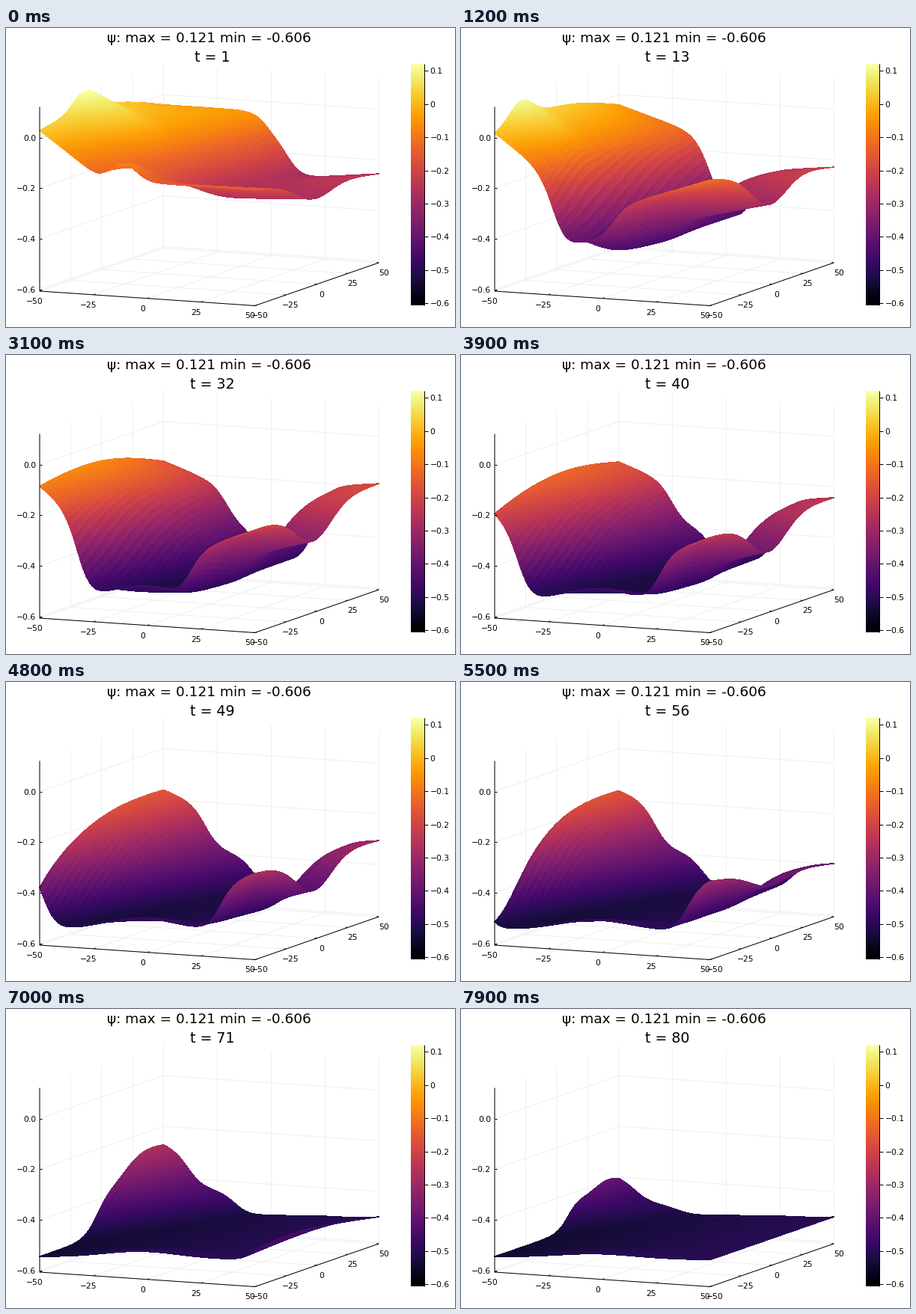
Recreate the animation shown at these times as a matplotlib script. Size 600 px wide and 400 px high, loop 8000 ms.

```python
import numpy as np
import matplotlib.pyplot as plt
from matplotlib.animation import FuncAnimation
from matplotlib.collections import LineCollection, PolyCollection

W, H, DPI = 600, 400, 100
STEPS, INTERVAL = 80, 100
Z_MIN, Z_MAX = -0.606, 0.121
N = 71                 # mesh points per side
CMAP = plt.get_cmap("inferno")
plt.rcParams["font.family"] = "DejaVu Sans"

U, V = np.meshgrid(np.linspace(0, 1, N), np.linspace(0, 1, N))


def keyed(n, *points):
    steps, values = zip(*points)
    return np.interp(n, steps, values)


def mix(a, b, t):
    return a + (b - a) * t


def wall(x, width=0.032):
    """Smooth step from 0 to 1 around x = 0."""
    return (1 + np.tanh(x / width / 2)) / 2


def hill(x, center, width):
    return np.exp(-((x - center) / width) ** 2)


def height(n):
    """Two highlands left and right of a valley that sinks, then widens."""
    sunk = 1 - np.exp(-n / 6)

    # Heights of the four corners
    left = keyed(n, (0, 0.028), (12, 0.013), (31, -0.084), (48, -0.3))
    back = keyed(n, (0, -0.04), (12, -0.04), (31, -0.156), (63, -0.168), (79, -0.4))
    front = keyed(n, (0, -0.15), (12, -0.11), (31, -0.2), (63, -0.32), (79, -0.5))
    right = keyed(n, (0, -0.255), (31, -0.187), (48, -0.305), (63, -0.5))

    # Valley floor, with a swell along the front edge
    floor = (-0.5 - 0.045 * (1 - U)) * (0.28 + 0.72 * sunk)
    floor += 0.1 * (1 - n / 95) * hill(V, 0, 0.15) * hill(U, 0.47, 0.25)

    # Left highland: a crest slides forward along its edge
    west = mix(left, back, V) + 0.05 * np.sin(np.pi * V)
    west -= U * mix(0.6, 0.3 * sunk, V)
    crest = 0.075 * np.clip((31 - n) / 10, 0, 1)
    west += crest * hill(V, 0.37 - 0.013 * n, 0.13) * hill(U, 0, 0.35)

    # Right highland, with a saddle halfway along its edge
    east = mix(front, right, V)
    east -= (1 - U) * mix(0.35 * sunk, 0.1, V)
    saddle = 0.13 * (0.5 + 0.5 * sunk) * np.clip((60 - n) / 12, 0, 1)
    east -= saddle * hill(V, 0.47, 0.2)

    # The valley's borders retreat; the left one splits into a terrace
    west_end = mix(0.30 - 1.2e-4 * n ** 2, 0.48 - 0.0036 * n, V)
    east_end = mix(0.44 + 0.0082 * n, 0.58 + 0.004 * n, V)
    split = 0.11 * min(n / 48, 1) * V
    west_part = (wall(west_end - split - U) + wall(west_end + split - U)) / 2
    east_part = wall(U - east_end)
    z = floor + west_part * (west - floor) + east_part * (east - floor)
    return np.clip(z, Z_MIN, Z_MAX)


def project(x, y, z):
    px = 45 + 2.877 * (x + 50) + 1.655 * (y + 50)
    py = 352 + 0.195 * (x + 50) - 0.575 * (y + 50) - 339 * (z - Z_MIN)
    return np.stack(np.broadcast_arrays(px, py), axis=-1)


def pt(px):
    return px * 72 / DPI


fig = plt.figure(figsize=(W / DPI, H / DPI), dpi=DPI, facecolor="white")
ax = fig.add_axes([0, 0, 1, 1])
ax.axis("off")


def label(x, y, text, ha="center", size=10.8, va="center_baseline"):
    return ax.text(x, y, text, ha=ha, va=va, fontsize=pt(size), zorder=6)


def lines(segments, color, width, zorder):
    ax.add_collection(LineCollection(segments, colors=color,
                                     linewidths=pt(width), zorder=zorder))


def number(value, digits):
    return f"{value:.{digits}f}".replace("-", "\u2212")


# Grid on the floor and the two back walls
ticks = range(-50, 51, 25)
z_ticks = [0.0, -0.2, -0.4, -0.6]
paths = []
for c in ticks:
    paths.append([(c, -50, Z_MIN), (c, 50, Z_MIN), (c, 50, Z_MAX)])
    paths.append([(50, c, Z_MIN), (-50, c, Z_MIN), (-50, c, Z_MAX)])
for c in z_ticks:
    paths.append([(-50, -50, c), (-50, 50, c), (50, 50, c)])
lines([[project(*p) for p in path] for path in paths], "#ededed", 0.9, 1)

# Axes, tick marks and tick labels
axis = [(-50, -50, Z_MAX), (-50, -50, Z_MIN), (50, -50, Z_MIN), (50, 50, Z_MIN)]
marks = [[project(*p) for p in axis]]
for c in ticks:
    x, y = project(c, -50, Z_MIN)
    marks.append([(x, y), (x + 2.8, y - 1)])
    label(x - 6.5, y + 13, number(c, 0))
    x, y = project(50, c, Z_MIN)
    marks.append([(x, y), (x - 3, y - 0.2)])
    label(x + 6.5, y + 13, number(c, 0))
for c in z_ticks:
    x, y = project(-50, -50, c)
    marks.append([(x, y), (x + 3, y)])
    label(x - 5, y, number(c, 1), "right")

# Colour bar
BAR_L, BAR_R, BAR_T, BAR_B = 540.5, 558.5, 48, 371
ax.imshow(np.linspace(1, 0, 256)[:, None], cmap=CMAP, aspect="auto",
          extent=(BAR_L, BAR_R, BAR_B, BAR_T), zorder=2)
ax.set_xlim(0, W)
ax.set_ylim(H, 0)
marks.append([(BAR_R, BAR_T), (BAR_R, BAR_B)])
for k in range(1, -7, -1):
    y = BAR_T + (Z_MAX - k / 10) / (Z_MAX - Z_MIN) * (BAR_B - BAR_T)
    marks.append([(BAR_R, y), (BAR_R + 5, y)])
    label(566.5, y, number(k / 10, 1) if k else "0", "left")
lines(marks, "black", 1, 5)

label(271.5, 19, f"ψ: max = {Z_MAX} min = {Z_MIN}", size=18.5, va="baseline")
clock = label(275.5, 45, "", size=19, va="baseline")

surface = PolyCollection([], edgecolors="face", linewidths=0.3,
                         antialiaseds=False, zorder=3)
ax.add_collection(surface)


def corners(a):
    """The four corner views of every mesh cell."""
    return a[:-1, :-1], a[:-1, 1:], a[1:, 1:], a[1:, :-1]


def draw(n):
    z = height(n)
    p = project(U * 100 - 50, V * 100 - 50, z)[::-1]      # far rows first
    surface.set_verts(np.stack(corners(p), axis=2).reshape(-1, 4, 2))
    mean = sum(corners(z[::-1])) / 4
    surface.set_facecolor(CMAP((mean.ravel() - Z_MIN) / (Z_MAX - Z_MIN)))
    clock.set_text(f"t = {n + 1}")
    return surface, clock


anim = FuncAnimation(fig, draw, frames=STEPS, interval=INTERVAL,
                     repeat=True, repeat_delay=0, blit=False)
plt.show()
```
